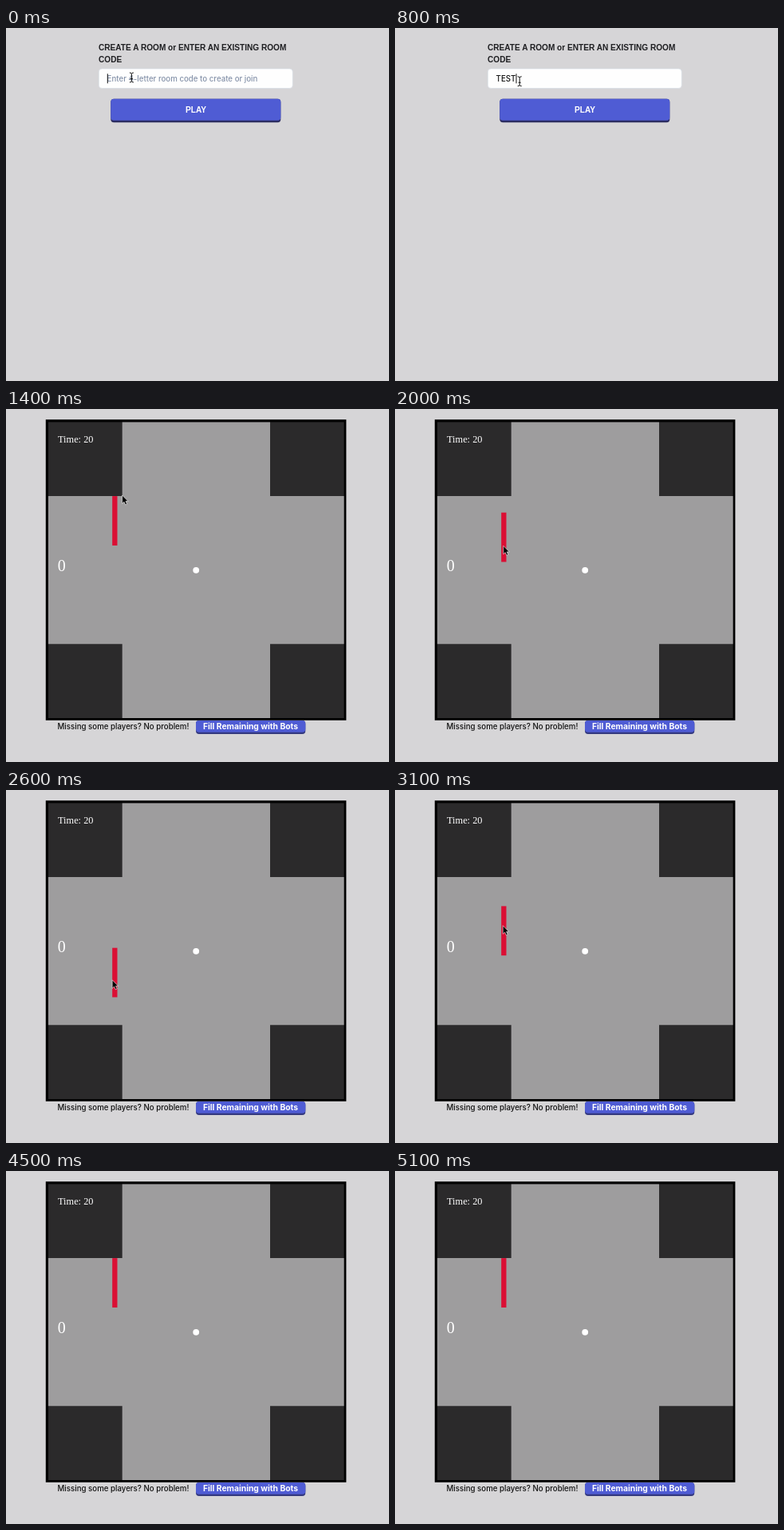
Recreate the animation shown at these times as an HTML page. Size 480 by 442 pixels, loop 5.4 s.

```html
<!DOCTYPE html>
<html lang="en">
<head>
<meta charset="utf-8">
<title>Room and board</title>
<style>
  html, body { margin: 0; width: 100%; height: 100%; overflow: hidden; background: #d6d5d7; }
  svg { display: block; width: 480px; height: 442px; }
  .head { font: bold 10.1px "Liberation Sans", Arial, sans-serif; fill: #1f1f22; }
  .ui { font: 500 9.7px Inter, sans-serif; fill: #111; }
  .bold { font: bold 10.3px Inter, sans-serif; fill: #fff; text-anchor: middle; }
  .serif { font-family: "Liberation Serif", Times, serif; fill: #fff; }
  .face { fill: #4f5cd4; }
</style>
</head>
<body>
<svg viewBox="0 0 480 442">
  <g id="lobby">
    <text class="head" x="116" y="28">CREATE A ROOM or ENTER AN EXISTING ROOM</text>
    <text class="head" x="116" y="43">CODE</text>
    <rect x="116.3" y="51" width="243" height="24.5" rx="4" fill="#fefefe" stroke="#d3dbe4" stroke-width=".6"/>
    <text id="hint" class="ui" x="126.6" y="67" style="fill:#8592a9">Enter 4-letter room code to create or join</text>
    <text id="code" class="ui" x="126.6" y="67"></text>
    <rect id="caret" y="57.3" width="1" height="12" fill="#111"/>
    <rect id="ring" x="130.7" y="88.2" width="214.2" height="30.6" rx="4.5" fill="none" stroke="#a9d6f8" stroke-width="1.4"/>
    <rect x="131.3" y="88.8" width="213" height="29.4" rx="4" fill="#2c2d62"/>
    <rect class="face" x="131.3" y="88.8" width="213" height="27" rx="4"/>
    <text class="head" x="238" y="106" text-anchor="middle" style="fill:#fff">PLAY</text>
  </g>
  <g id="game">
    <rect x="49.8" y="13.2" width="376.6" height="376.6" fill="#000"/>
    <rect x="53" y="16.4" width="370.6" height="370.6" fill="#2b2a2b"/>
    <path d="M145.7 16.4H331V109.1H423.6V294.3H331V387H145.7V294.3H53V109.1H145.7Z" fill="#9e9d9e"/>
    <text class="serif" x="65" y="41.6" font-size="12.35">Time: 20</text>
    <text class="serif" x="64.7" y="202.6" font-size="20">0</text>
    <circle cx="238.2" cy="201.8" r="3.9" fill="#fff"/>
    <rect id="paddle" x="133.2" width="6.3" height="61.8" fill="#db0e34"/>
    <text class="ui" x="64.5" y="401">Missing some players? No problem!</text>
    <rect x="238" y="390" width="137.3" height="17" rx="4" fill="#34397f"/>
    <rect class="face" x="238" y="390" width="137.3" height="14.8" rx="4"/>
    <text class="bold" x="306.5" y="401">Fill Remaining with Bots</text>
  </g>
  <path id="beam" d="M-2.5 -6Q0 -6 0 -4.5Q0 -6 2.5 -6M0 -4.5V4.5M-2.5 6Q0 6 0 4.5Q0 6 2.5 6M-1.5 1.5H1.5" fill="none" stroke="#111"/>
  <path id="arrow" d="M0 0V10.5L2.4 8.3L4.1 12L6 11.1L4.4 7.6H7.5Z" fill="#000" stroke="#fff" stroke-width=".6"/>
</svg>
<script>
const LOOP = 5400, STEP = 100, LAG = 45;
const START = 1400;            // the game replaces the lobby
const HALF = 30.9, TOP = 109.1, BOTTOM = 294.3;

const $ = id => document.getElementById(id);
const show = (id, on) => { $(id).style.display = on ? "" : "none"; };
const clamp = (v, lo, hi) => Math.min(hi, Math.max(lo, v));
const ease = u => u * u * (3 - 2 * u);

// Pointer moves: start ms, end ms, x and y reached
const moves = [
  [700, 1200, 145.6, 108],
  [1700, 2100, 134, 183],
  [2300, 2700, 133, 248],
  [2700, 3150, 135.3, 167],
  [3150, 3500, 135.3, 170],
  [3950, 4000, 135.3, 172],
  [4200, 4400, 372, 1],
  [4400, 4500, 372, -20]
];

function pointerAt(t) {
  let x = 157.4, y = 62;
  for (const [start, end, toX, toY] of moves) {
    const k = ease(clamp((t - start) / (end - start), 0, 1));
    x += (toX - x) * k;
    y += (toY - y) * k;
  }
  return { x, y };
}

function drawLobby(t) {
  const typed = t ? 1 + Math.floor(t / 200) : 0;
  const code = $("code");
  code.textContent = "TEST".slice(0, typed);
  $("caret").setAttribute("x", 126.8 + (typed ? code.getComputedTextLength() : 0));
  const clicked = t >= 1200;
  show("hint", !typed);
  show("caret", !clicked);
  show("ring", clicked);
}

function drawGame(t) {
  const centre = clamp(pointerAt(t - LAG).y, TOP + HALF, BOTTOM - HALF);
  $("paddle").setAttribute("y", centre - HALF);
}

function draw(time) {
  const t = Math.floor(time % LOOP / STEP) * STEP;
  const lobby = t < START;
  show("lobby", lobby);
  show("game", !lobby);
  (lobby ? drawLobby : drawGame)(t);

  const { x, y } = pointerAt(t);
  const typing = t >= 100 && t < 800;
  const overInput = lobby && y < 76;
  for (const id of ["beam", "arrow"]) {
    $(id).setAttribute("transform", `translate(${x} ${y})`);
    show(id, !typing && (id === "beam") === overInput);
  }
}

function tick() {
  draw(performance.now());
  requestAnimationFrame(tick);
}
tick();
</script>
</body>
</html>
```
